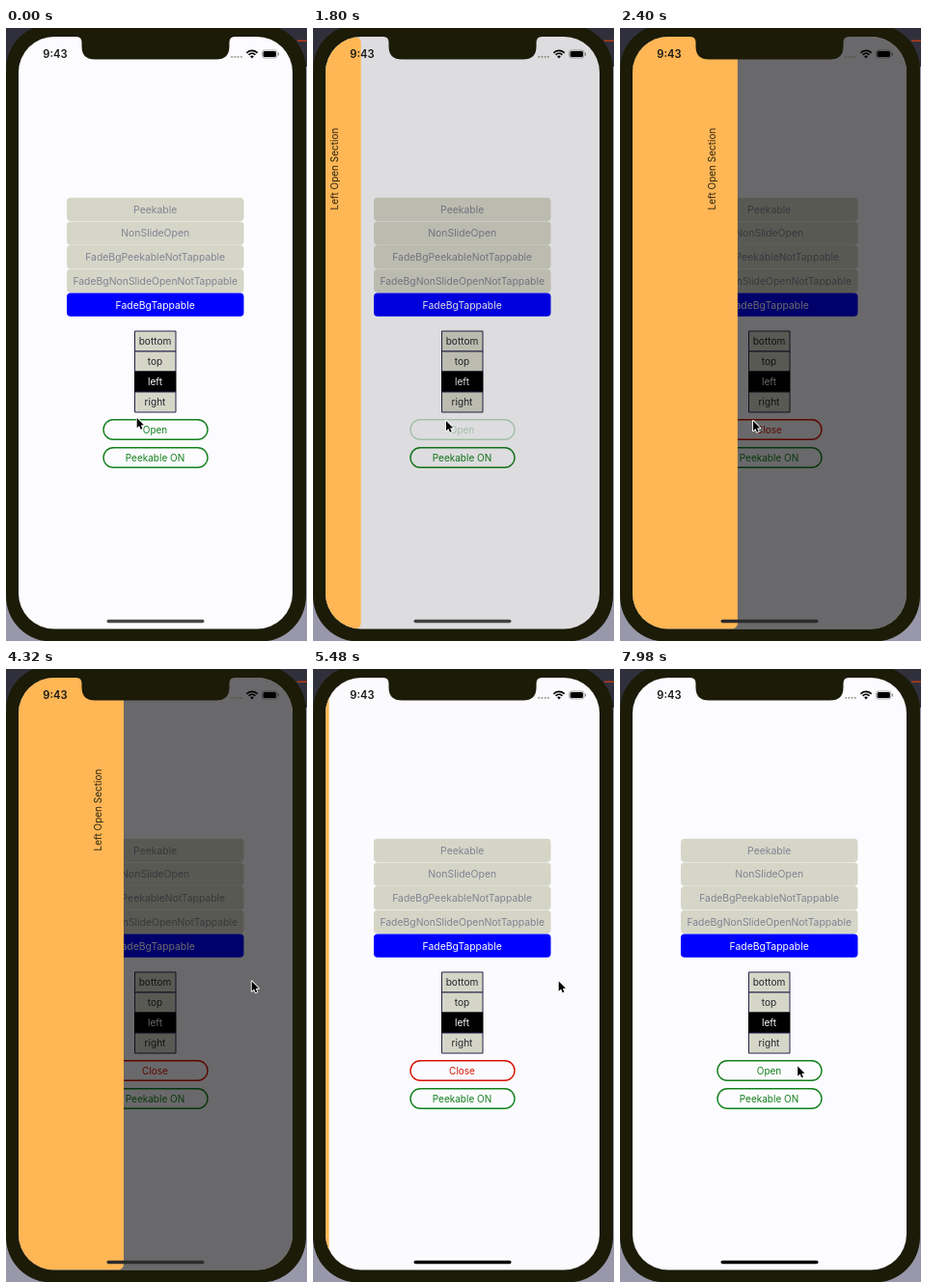
Recreate the animation shown at these times as an HTML page with a canvas. Size 312x635 px, loop 8000 ms.

```html
<!DOCTYPE html>
<html lang="en">
<head>
<meta charset="utf-8">
<title>Drawer demo</title>
<style>
html, body { margin: 0; width: 100%; height: 100%; overflow: hidden; background: #9898aa; }
canvas { display: block; width: 312px; height: 635px; }
</style>
</head>
<body>
<canvas id="stage"></canvas>
<script>
const W = 312, H = 635, LOOP = 8000;
const OPEN_AT = 1730, CLOSE_AT = 5273, SWAP_DELAY = 430;
const SCREEN = { x: 13, y: 9, w: 284, h: 613.5, r: 37 };
const PANEL_W = 109;
const FONT = 'Inter, "Liberation Sans", sans-serif';
const GREY = '#d6d6c8';

const canvas = document.getElementById('stage');
const dpr = window.devicePixelRatio || 1;
canvas.width = W * dpr;
canvas.height = H * dpr;
const ctx = canvas.getContext('2d');

const clamp = v => Math.max(0, Math.min(1, v));
const ramp = (t, a, b) => clamp((t - a) / (b - a));
const ease = u => u * u * (3 - 2 * u);
const mix = (a, b, u) => a + (b - a) * u;

// Underdamped spring from 0 to 1
function spring(ms) {
  if (ms <= 0) return 0;
  const w = 15.2, z = 0.73, s = ms / 1000;
  const wd = w * Math.sqrt(1 - z * z);
  return 1 - Math.exp(-z * w * s) * (Math.cos(wd * s) + z * w / wd * Math.sin(wd * s));
}

function box(x, y, w, h, r, fill, stroke, line = 1) {
  ctx.beginPath();
  ctx.roundRect(x, y, w, h, r);
  if (fill) { ctx.fillStyle = fill; ctx.fill(); }
  if (stroke) { ctx.strokeStyle = stroke; ctx.lineWidth = line; ctx.stroke(); }
}

function label(str, x, y, size, color, weight = 400) {
  ctx.font = `${weight} ${size}px ${FONT}`;
  ctx.textAlign = 'center';
  ctx.textBaseline = 'alphabetic';
  ctx.fillStyle = color;
  ctx.fillText(str, x, y + size * 0.36);
}

function pill(str, y, color) {
  box(101, y - 10.3, 108, 20.6, 10.3, null, color, 1.4);
  label(str, 154.5, y, 10, color);
}

function drawContent(t) {
  const modes = ['Peekable', 'NonSlideOpen', 'FadeBgPeekableNotTappable',
    'FadeBgNonSlideOpenNotTappable', 'FadeBgTappable'];
  modes.forEach((name, i) => {
    const on = i === 4, y = 175.7 + i * 24.7;
    box(63, y, 183.5, 24.3, 4, on ? '#0000ff' : GREY);
    label(name, 154.7, y + 12.3, 10.4, on ? '#fff' : '#828293');
  });

  ['bottom', 'top', 'left', 'right'].forEach((name, i) => {
    const on = i === 2, y = 314 + i * 21;
    box(133.5, y, 42.5, 21, 0, on ? '#000' : GREY, on ? '#000' : '#24244c');
    label(name, 154.5, y + 10.4, 10.1, on ? '#fff' : '#24242e');
  });

  const opened = t >= OPEN_AT + SWAP_DELAY && t < CLOSE_AT + SWAP_DELAY;
  const press = ramp(t, 1660, 1790) - ramp(t, 1810, 2060);
  ctx.globalAlpha = 1 - 0.72 * press;
  pill(opened ? 'Close' : 'Open', 416, opened ? '#d81400' : '#14801c');
  ctx.globalAlpha = 1;
  pill('Peekable ON', 445, '#14801c');
}

function drawPanel(p) {
  const edge = SCREEN.x + PANEL_W * p;
  if (edge <= SCREEN.x) return;
  box(edge - 160, SCREEN.y, 160, SCREEN.h, 6, '#ffb655');
  ctx.save();
  ctx.translate(edge - 26.8, 146);
  ctx.rotate(-Math.PI / 2);
  label('Left Open Section', 0, 0, 10, '#2c2410');
  ctx.restore();
}

function drawStatus() {
  label('9:43', 51, 27.3, 11.2, '#181814', 600);
  ctx.fillStyle = 'rgba(70,70,45,.5)';
  for (let i = 0; i < 4; i++) ctx.fillRect(233.3 + i * 3.2, 29, 1.8, 1.8);

  ctx.strokeStyle = ctx.fillStyle = '#000';
  ctx.lineWidth = 1.7;
  for (const r of [4.6, 7.6]) {
    ctx.beginPath();
    ctx.arc(255, 31, r, -Math.PI * 0.76, -Math.PI * 0.24);
    ctx.stroke();
  }
  ctx.beginPath();
  ctx.moveTo(255, 31.5);
  ctx.arc(255, 31, 2.4, -Math.PI * 0.78, -Math.PI * 0.22);
  ctx.fill();

  box(265.5, 23, 15.5, 8, 2.4, null, 'rgba(0,0,0,.4)', 0.8);
  box(266.6, 24.1, 13.3, 5.8, 1.5, '#000');
  box(281.9, 25.6, 1.1, 2.8, 0.5, 'rgba(0,0,0,.45)');
}

function drawHomeBar(t) {
  const shade = mix(72, 0, t < 4500 ? 0.4 * ramp(t, 1700, 2200) : ramp(t, 4500, 5270));
  box(104.5, 612.8, 101, 3.4, 1.7, `rgb(${shade},${shade},${shade})`);
}

function drawNotch() {
  ctx.beginPath();
  ctx.moveTo(73, 8);
  ctx.lineTo(73, 9);
  ctx.quadraticCurveTo(78.5, 9, 78.5, 15);
  ctx.lineTo(78.5, 19);
  ctx.quadraticCurveTo(78.5, 32.5, 92, 32.5);
  ctx.lineTo(218, 32.5);
  ctx.quadraticCurveTo(231.5, 32.5, 231.5, 19);
  ctx.lineTo(231.5, 15);
  ctx.quadraticCurveTo(231.5, 9, 237, 9);
  ctx.lineTo(237, 8);
  ctx.closePath();
  ctx.fillStyle = '#1b1b08';
  ctx.fill();
}

function drawCursor(t) {
  const nudge = ease(ramp(t, 900, 1500));
  const away = ease(ramp(t, 2500, 3200));
  const back = ease(ramp(t, 6500, 7500));
  const x = 135.7 + 2.3 * nudge + 116.7 * away - 70.5 * back;
  const y = 404 + 3 * nudge - 83.5 * away + 88 * back;
  const shape = [[0, 0], [0, 10.2], [2.4, 8.1], [4, 11.7], [5.7, 11], [4.1, 7.5], [7.2, 7.3]];
  ctx.beginPath();
  shape.forEach(([dx, dy]) => ctx.lineTo(x + dx, y + dy));
  ctx.closePath();
  ctx.lineJoin = 'round';
  ctx.lineWidth = 1.8;
  ctx.strokeStyle = '#fff';
  ctx.stroke();
  ctx.fillStyle = '#000';
  ctx.fill();
}

function draw(t) {
  const p = t < CLOSE_AT ? spring(t - OPEN_AT) : 1 - spring(t - CLOSE_AT);

  ctx.setTransform(dpr, 0, 0, dpr, 0, 0);
  ctx.fillStyle = '#9898aa';
  ctx.fillRect(0, 0, W, H);
  ctx.fillStyle = '#30303c';
  ctx.fillRect(0, 0, W, 40);
  ctx.fillStyle = '#b83a18';
  ctx.fillRect(302, 12.5, 10, 1.5);
  box(0, -4, 311, 639.5, 47, '#1b1b08');

  ctx.save();
  box(SCREEN.x, SCREEN.y, SCREEN.w, SCREEN.h, SCREEN.r, '#fcfcff');
  ctx.clip();
  drawContent(t);
  const dim = 0.58 * Math.pow(clamp(p), 1.4);
  ctx.fillStyle = `rgba(0,0,0,${dim})`;
  ctx.fillRect(0, 0, W, H);
  drawPanel(p);
  drawStatus();
  drawHomeBar(t);
  ctx.restore();

  drawNotch();
  drawCursor(t);
}

const start = performance.now();
function tick() {
  draw((performance.now() - start) % LOOP);
  requestAnimationFrame(tick);
}
tick();
</script>
</body>
</html>
```
